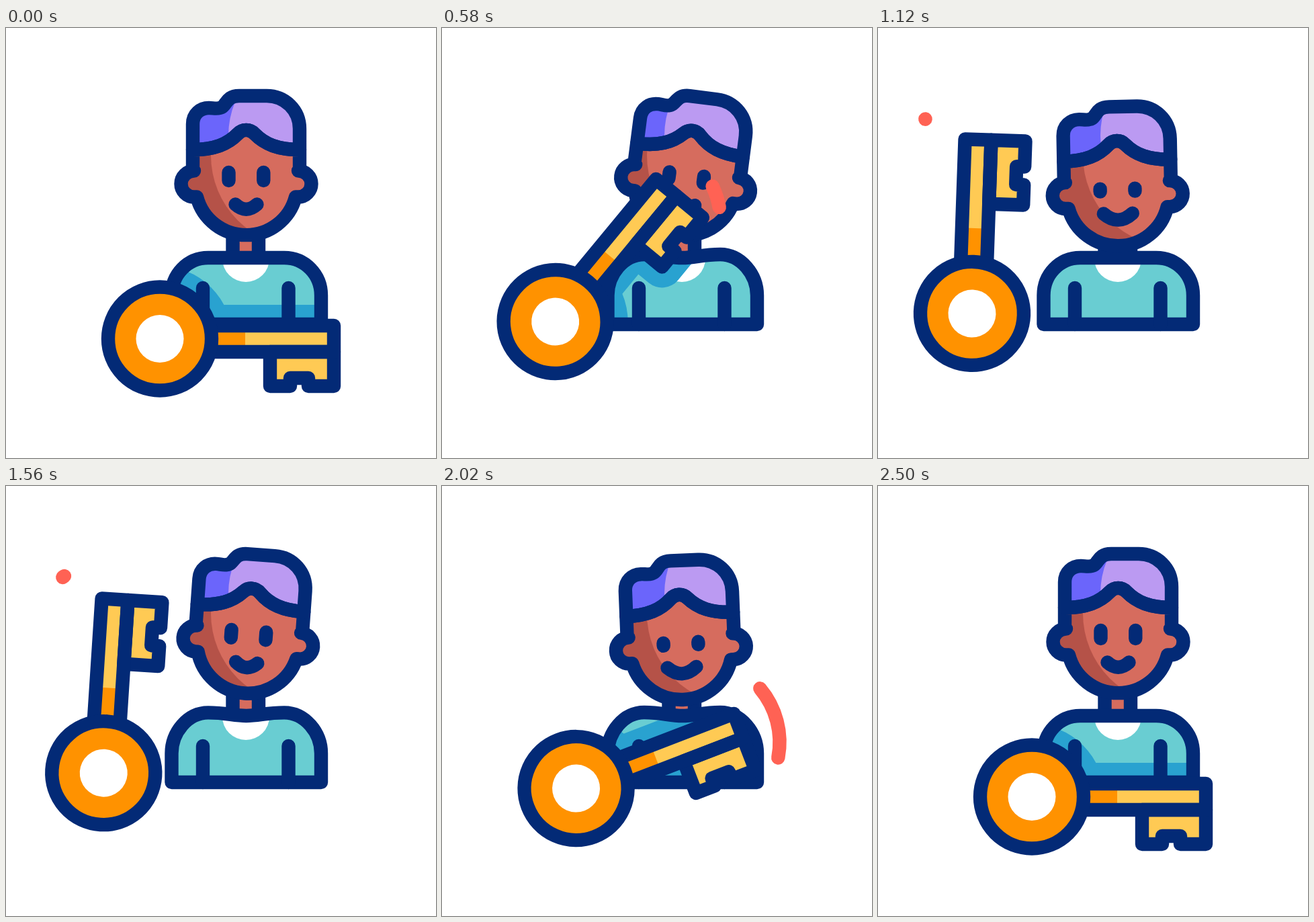
An HTML page with a canvas for the animation above (3600 ms loop, 640 by 640 pixels).

```html
<!DOCTYPE html>
<html lang="en">
<head>
<meta charset="utf-8">
<title>Person with key</title>
<style>
html, body { margin: 0; width: 100%; height: 100%; overflow: hidden; background: #fff; }
canvas { display: block; width: 640px; height: 640px; }
</style>
</head>
<body>
<canvas></canvas>
<script>
const LOOP = 3600, MIRROR = 2480; // the swing plays forward, then back
const NAVY = '#032a76', SKIN = '#d66c5e', SKIN_DARK = '#b55248', HAIR = '#bb9af2', HAIR_DARK = '#6b65fb',
  SHIRT = '#69cdd2', SHIRT_DARK = '#29a2d0', ORANGE = '#ff9200', YELLOW = '#ffca54', RED = '#ff6254';

const canvas = document.querySelector('canvas');
const ctx = canvas.getContext('2d');
const dpr = window.devicePixelRatio || 1;
canvas.width = canvas.height = 640 * dpr;

const rad = degrees => degrees * Math.PI / 180;

const circle = (x, y, r) => {
  const p = new Path2D();
  p.arc(x, y, r, 0, 7);
  return p;
};

const fringe = 'C405 181 385 173 370 157.5C363 150 352 150 345 157.5C330 173 310 181 278 181Z';
const face = new Path2D('M278 181V212.5H280A19.5 19.5 0 0 0 280 251.5H284A76 76 0 0 0 431 251.5H435' +
  'A19.5 19.5 0 0 0 435 212.5H437V181' + fringe);
const hair = new Path2D('M278 181V143C278 128 289 119 302 119C308 119 313 120.5 318 119' +
  'C329 117 326 101 347 101H388C415 101 437 122 437 150V181' + fringe);
const faceLight = circle(441, 190, 136), hairLight = circle(461, 160, 130);
const neck = new Path2D('M337.5 300V342M376 342V300');
const arms = new Path2D('M293 387V441M420.5 387V441');
const collar = circle(357, 343, 35);

// Key parts, with the centre of the ring as origin
const shaft = new Path2D('M60 -19.5H259V19.5H60Z');
const shaftNear = new Path2D('M60 -19.5H127V19.5H60Z');
const bit = new Path2D('M164 19.5V70.5H194V58.5H221V70.5H259V19.5Z');
const ring = circle(0, 0, 77), hole = circle(0, 0, 35.5);

function ease(t, from, to) {
  const u = Math.min(1, Math.max(0, (t - from) / (to - from)));
  return u * u * (3 - 2 * u);
}

// Wind up, swing, settle: each part is a sum of eased steps
function poseAt(t) {
  const e = (from, to) => ease(t, from, to);
  return {
    move: .64 * e(300, 680) + .36 * e(100, 1240),
    turn: 7 * (e(0, 250) - e(250, 480)) - 46 * e(350, 580) - 42 * e(480, 980),
    drop: 26 * (e(0, 340) - e(360, 530)) + 22 * e(890, 1240),
    tilt: -9 * e(0, 340) + 17.2 * e(340, 620) - 9.3 * e(735, 1135),
    smile: e(0, 320) - e(470, 640) + e(900, 1080),
    lift: 5 * (e(0, 320) - e(880, 1110))
  };
}

function fill(path, color) {
  ctx.fillStyle = color;
  ctx.fill(path);
}

function stroke(path, color = NAVY, width = 20.4) {
  ctx.strokeStyle = color;
  ctx.lineWidth = width;
  ctx.stroke(path);
}

function group(draw) {
  ctx.save();
  draw();
  ctx.restore();
}

const stage = () => ctx.setTransform(dpr, 0, 0, dpr, 0, 0);

// The light stays put on stage while the shape moves through it
function lit(path, dark, color, light) {
  fill(path, dark);
  group(() => {
    ctx.clip(path);
    stage();
    fill(light, color);
  });
}

function placeKey(pose) {
  ctx.translate(229 - 90 * pose.move, 462.5 - 38 * pose.move);
  ctx.rotate(rad(pose.turn));
}

function drawBody(pose) {
  const y = 342 - pose.lift;
  const torso = new Path2D(`M246.5 441V398C246.5 367 270 ${y} 301 ${y}C328 ${y} 338 342 357.5 342` +
    `S387 ${y} 414 ${y}C445 ${y} 469 367 469 398V441Z`);
  ctx.fillStyle = SKIN;
  ctx.fillRect(337, 300, 39, 42);
  stroke(neck);
  fill(torso, SHIRT);
  group(() => {
    ctx.clip(torso);
    fill(collar, '#fff');
    placeKey(pose);
    for (const part of [shaft, bit, ring]) {
      fill(part, SHIRT_DARK);
      stroke(part, SHIRT_DARK, 62);
    }
  });
  stroke(torso);
  stroke(arms);
}

function drawHead(pose) {
  ctx.translate(357.5, 272 + pose.drop);
  ctx.rotate(rad(pose.tilt));
  ctx.translate(-357.5, -272);
  lit(face, SKIN_DARK, SKIN, faceLight);
  lit(hair, HAIR_DARK, HAIR, hairLight);
  stroke(face);
  stroke(hair);
  const s = pose.smile, eye = 215 + 8 * s, half = 16 + 5.5 * s, end = 262.5 - 2.5 * s;
  stroke(new Path2D(`M331.5 ${eye}V227M383.3 ${eye}V227`));
  stroke(new Path2D(`M${357.5 - half} ${end}Q357.5 ${277 + 2 * s} ${357.5 + half} ${end}`));
}

function drawKey(pose) {
  placeKey(pose);
  fill(bit, YELLOW);
  fill(shaft, YELLOW);
  fill(shaftNear, ORANGE);
  stroke(bit);
  stroke(shaft);
  fill(ring, ORANGE);
  stroke(ring);
  fill(hole, '#fff');
}

// Streak at the tip of the key: its two ends run along a small arc, one after the other
function drawTrail(pose, t) {
  const out = t > 440 && t < 1140, back = t > 1520 && t < 2390;
  if (!out && !back) return;
  const from = out ? 40 - 80 * ease(t, 440, 947) : 80 * ease(t, 1830, 2400) - 40;
  const to = out ? 40 - 80 * ease(t, 620, 1130) : 80 * ease(t, 1510, 2148) - 40;
  const trail = new Path2D();
  trail.arc(191.7, 0, 124, rad(from), rad(to + .05));
  placeKey(pose);
  stroke(trail, RED, 20.5);
}

function frame() {
  const t = performance.now() % LOOP;
  const pose = poseAt(Math.min(t, MIRROR - t));
  stage();
  ctx.clearRect(0, 0, 640, 640);
  ctx.lineCap = ctx.lineJoin = 'round';
  for (const draw of [drawBody, drawHead, drawKey, drawTrail]) group(() => draw(pose, t));
  requestAnimationFrame(frame);
}
frame();
</script>
</body>
</html>
```
